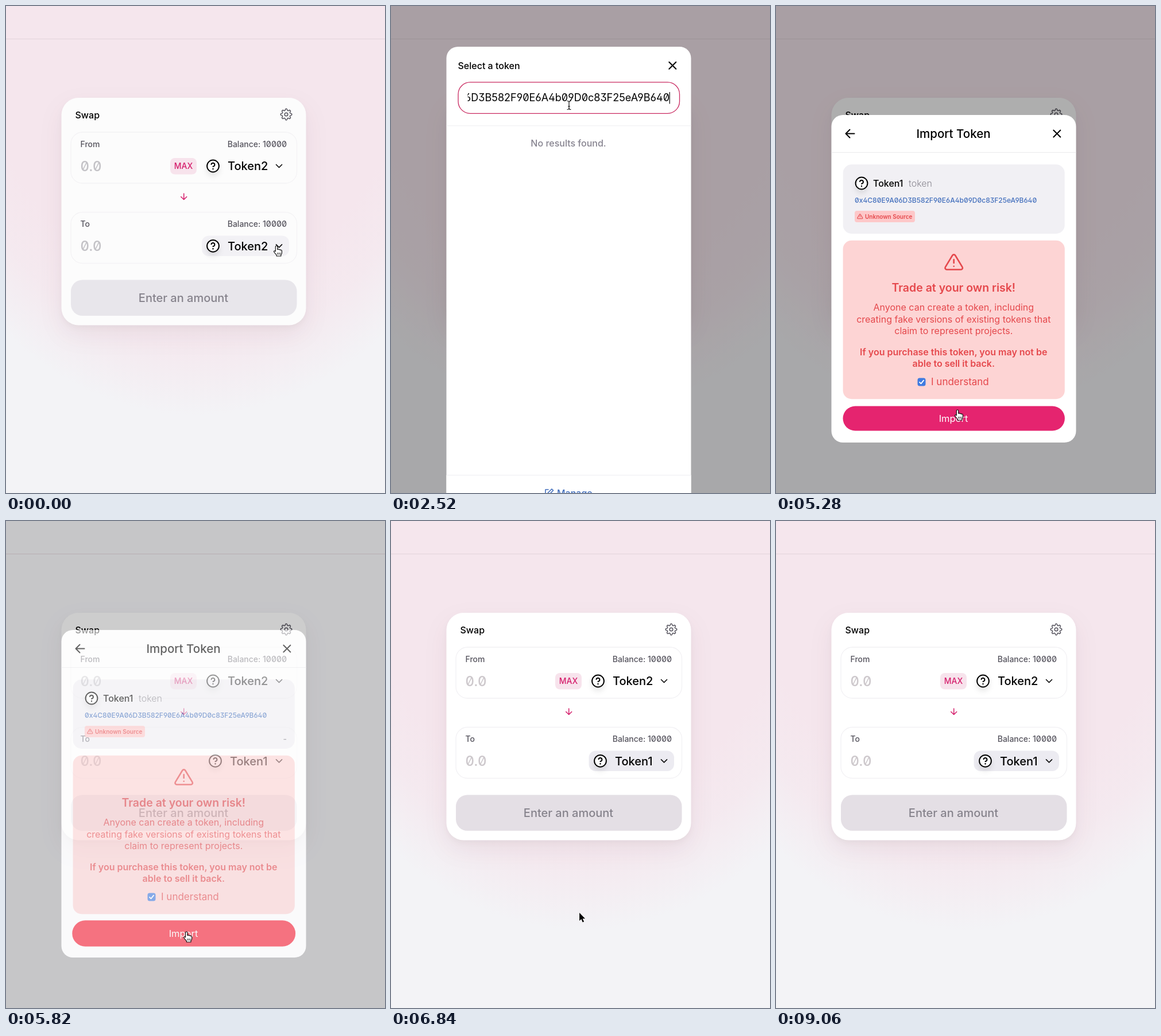
These frames come from a looping animation (660 by 849 pixels, 9.36 s). An HTML page:

```html
<!DOCTYPE html>
<html lang="en">
<head>
<meta charset="utf-8">
<title>Token swap</title>
<style>
  html, body { margin: 0; width: 100%; height: 100%; overflow: hidden; background: #f3f3f6; }
  svg { display: block; width: 660px; height: 849px; }
  text { font-family: Inter, "Liberation Sans", sans-serif; font-feature-settings: "zero", "ss01"; font-optical-sizing: none; white-space: pre; }
  .line { fill: none; stroke-linecap: round; stroke-linejoin: round; }
  .card { fill: #fcfcfc; filter: drop-shadow(0 4px 5px rgba(60,20,40,.04)) drop-shadow(0 16px 20px rgba(60,20,40,.06)); }
  .panel { fill: none; stroke: #f4f3f5; stroke-width: 1.3; }
  .zero { fill: #c3c2c6; }
  .action { fill: #e8e6eb; }
  .pill { fill: #f2f1f5; }
  .done .card { fill: #fff; }
  .done .panel { stroke: #f2f1f4; }
  .done .zero { fill: #cdc8cc; }
  .done .action { fill: #e4dfe5; }
  .done .pill { fill: #ecebf1; }
  .shade { filter: drop-shadow(0 6px 5px rgba(0,0,0,.09)); }
</style>
</head>
<body>
<svg id="stage" viewBox="0 0 660 849"></svg>
<script>
const LOOP = 9360, STEP = 60;
const ADDRESS = '0x4C80E9A06D3B582F90E6A4b09D0c83F25eA9B640';
const PINK = '#e5246f', RED = '#e5484c', BLUE = '#4470bd', GREY = '#56545e';

const text = (x, y, size, weight, fill, str, anchor = 'start', extra = '') =>
  `<text x="${x}" y="${y}" font-size="${size}" font-weight="${weight}" fill="${fill}" text-anchor="${anchor}" ${extra}>${str}</text>`;
const box = (x, y, w, h, r, extra) =>
  `<rect x="${x}" y="${y}" width="${w}" height="${h}" rx="${r}" ${extra}/>`;
const line = (d, color, width, extra = '') =>
  `<path class="line" d="${d}" stroke="${color}" stroke-width="${width}" ${extra}/>`;
const group = (id, body, extra = '') => `<g id="${id}" ${extra}>${body}</g>`;

const help = (x, y) => `<g transform="translate(${x} ${y})">
  <circle class="shade" r="11.5" fill="#fff"/>
  <circle r="10.4" fill="none" stroke="#000" stroke-width="2"/>
  ${line('M-3-3a3 3 0 0 1 5.9 1c0 2-2.9 3-2.9 3', '#000', 2)}<circle cy="5" r="1.2"/></g>`;
const close = (x, y) => line(`M${x - 6} ${y - 6}l12 12m0-12l-12 12`, '#000', 2);
const chevron = y => line(`M470.5 ${y - 2.5}l5 5 5-5`, '#111', 1.7);
const warn = (x, y, s, w) => `<g transform="translate(${x} ${y}) scale(${s})">
  ${line('M-1.7-8.1L-10.2 6a2 2 0 0 0 1.7 3H8.5a2 2 0 0 0 1.7-3L1.7-8.1a2 2 0 0 0-3.4 0zM0-3v4M0 5v.01', RED, w)}</g>`;

function gear(x, y) {
  let d = '';
  for (let i = 0; i <= 96; i++) {
    const a = i / 96 * 2 * Math.PI;
    const r = 8.4 + 1.35 * Math.tanh(2 * Math.cos(8 * a));
    d += `${i ? 'L' : 'M'}${(x + r * Math.sin(a)).toFixed(2)} ${(y - r * Math.cos(a)).toFixed(2)}`;
  }
  return line(d + 'z', GREY, 1.5) + `<circle cx="${x}" cy="${y}" r="2.8" fill="none" stroke="${GREY}" stroke-width="1.5"/>`;
}

const backdrop = `
  <defs>
    <radialGradient id="glow" gradientUnits="userSpaceOnUse" cx="0" cy="0" r="1" gradientTransform="translate(330 0) scale(660 849)">
      <stop offset=".58" stop-color="#f5e6ed"/>
      <stop offset=".7" stop-color="#f5e6ed" stop-opacity=".75"/>
      <stop offset=".84" stop-color="#f5e6ed" stop-opacity="0"/>
    </radialGradient>
    <clipPath id="field"><rect x="133.5" y="140" width="353" height="40"/></clipPath>
  </defs>
  <rect width="660" height="849" fill="#f3f3f6"/>
  ${box(0, 0, 660, 849, 0, 'id="pink" fill="url(#glow)"')}
  <rect y="57" width="660" height="1" fill="#e2d4db"/>`;

const token = (id, name, y, x) => group(id, help(x, y) + text(x + 25.5, y + 7.3, 20, 500, '#000', name));

const swap = group('swap', `
  ${box(96.5, 160, 426, 396.5, 30, 'class="card"')}
  ${text(120.5, 196, 16, 500, '#000', 'Swap')}
  ${gear(488, 189)}
  ${[220, 359.5].map(y => box(113, y, 393.5, 89, 20, 'class="panel"')).join('')}
  ${text(129.5, 245.6, 14, 500, GREY, 'From')}
  ${text(489, 245.6, 14, 500, GREY, 'Balance: 10000', 'end')}
  ${text(129.5, 287.7, 24, 500, '', '0.0', 'start', 'class="zero"')}
  ${box(286, 265, 46, 28.5, 8, 'fill="#f7e3ec"')}
  ${text(309, 284.3, 14, 500, '#d51f6c', 'MAX', 'middle')}
  ${token('from', 'Token2', 279, 360.5)}${chevron(279)}
  ${line('M309.7 327v10.5m-5-5l5 5 5-5', '#d51f6c', 1.5)}
  ${text(129.5, 385, 14, 500, GREY, 'To')}
  ${text(489, 385, 14, 500, GREY, 'Balance: 10000', 'end', 'id="balance"')}
  ${text(129.5, 426.9, 24, 500, '', '0.0', 'start', 'class="zero"')}
  ${box(341, 400.5, 152, 35.5, 12, 'id="pill" class="pill"')}
  ${token('old', 'Token2', 418.3, 360.5)}${token('new', 'Token1', 418.3, 364.5)}${chevron(418.3)}
  ${box(113, 477.5, 393.5, 62.5, 20, 'class="action"')}
  ${text(309, 516.2, 20, 500, '#86838c', 'Enter an amount', 'middle')}`);

const rows = [['Coin', 'Coin', '0'], ['Token2', 'token', '10000'], ['Token3', 'token', '0'], ['Token4', 'token', '0'], ['Test', 'token', '1000']];
const rowY = i => 241 + 56 * i;
const tokenRow = ([name, sub, sum], i) => {
  const y = rowY(i);
  return box(97, y - 28, 425, 56, 0, `class="row" fill="#f5f4f7"`) +
    `<g opacity="${i === 1 ? .5 : 1}">${help(129, y + 1)}
    ${text(157, y - 4, 16, 500, '#000', name)}
    ${text(157, y + 12, 12, 300, '#6e6b76', i ? sub + ' • Added by user' : sub)}
    ${text(503, y + 5, 16, 400, '#000', sum, 'end')}</g>`;
};

const select = group('select', `
  ${box(96.5, 71, 426, 809, 20, 'fill="#fff"')}
  ${text(116.5, 109.6, 16, 500, '#000', 'Select a token')}${close(490.3, 103.7)}
  ${group('list', rows.map(tokenRow).join(''))}
  ${box(117, 132.8, 385.5, 54.5, 21, 'id="search" fill="#fff" stroke-width="1.3"')}
  <g clip-path="url(#field)">
    ${text(133.5, 166.3, 18, 400, '#c3c1c9', 'Search name or paste address', 'start', 'id="hint"')}
    ${text(133.5, 166.3, 18, 400, '#000', ADDRESS, 'start', 'id="query"')}
  </g>
  ${box(484.6, 150, 1.2, 20.5, 0, 'id="caret" fill="#000"')}
  <rect x="96.5" y="208.3" width="426" height="1" fill="#eeeef1"/>
  ${text(309, 244.8, 16, 500, '#86838f', 'No results found.', 'middle', 'id="none"')}
  ${group('found', help(129, 257) + text(157, 263, 16, 500, '#000', 'Token1') +
    text(219, 262, 12.5, 300, '#8a8791', 'token') +
    box(427, 240.5, 77, 34, 17, 'id="add"') + text(465.2, 263, 14.7, 400, '#fff', 'Import', 'middle'))}
  <path d="M96.5 818H522.5V849H96.5z" fill="#fff"/>
  <rect x="96.5" y="817.5" width="426" height="1" fill="#eeeef1"/>
  ${line('M274 843h-5v13h13v-5M280 842l2.5 2.5-7 7-3.5 1 1-3.5z', BLUE, 1.6)}
  ${text(289, 854.5, 16, 500, BLUE, 'Manage')}`);

const body = (y, weight, str) => text(309.3, y, 16, weight, RED, str, 'middle');
const confirm = group('confirm', `
  ${box(96.5, 190, 426, 571, 20, 'fill="#fff"')}
  ${line('M136.5 222.5h-15m7-7l-7 7 7 7', '#000', 2)}
  ${text(309, 229.7, 20.5, 500, '#000', 'Import Token', 'middle')}${close(489.3, 222.5)}
  <rect x="96.5" y="254.8" width="426" height="1" fill="#e9e8ec"/>
  ${box(116.7, 276.3, 386, 120.7, 15, 'fill="#f1f0f4"')}
  ${help(149, 309)}
  ${text(169, 314.8, 16, 500, '#000', 'Token1')}
  ${text(231, 314.8, 16, 300, '#8a8791', 'token')}
  ${text(137, 343.3, 12, 500, BLUE, ADDRESS)}
  ${box(137, 357, 105, 20, 4, 'fill="#fdc8c9"')}
  ${warn(146.3, 366.8, .43, 2.5)}
  ${text(155, 370.6, 10, 600, RED, 'Unknown Source')}
  ${box(116.6, 408.8, 386.2, 276.4, 15, 'fill="#fdd4d4"')}
  ${warn(309.7, 446.5, 1.45, 1.8)}
  ${text(309.3, 497.6, 19.5, 600, RED, 'Trade at your own risk!', 'middle')}
  ${body(531.3, 400, 'Anyone can create a token, including')}
  ${body(551.6, 400, 'creating fake versions of existing tokens that')}
  ${body(572, 400, 'claim to represent projects.')}
  ${body(608.5, 600, 'If you purchase this token, you may not be')}
  ${body(628.8, 600, 'able to sell it back.')}
  ${box(247, 649, 13, 13, 2.5, 'id="check" stroke-width="1"')}
  ${line('M250 655.8l2.5 2.6 4.6-5.8', '#fff', 1.8, 'id="tick"')}
  ${text(270, 661.3, 17, 400, RED, 'I understand')}
  ${box(116.5, 697.5, 386.4, 43, 21.5, 'id="go"')}
  ${text(309, 725.4, 16.5, 400, '#fff', 'Import', 'middle', 'id="goText"')}`);

const pointers = `
  ${group('hand', `<path d="M-1.7 1.7a1.7 1.7 0 0 1 3.4 0V6.6c.4-1 2.6-.9 2.8.4.5-.8 2.4-.6 2.6.7.7-.6 2.3-.3 2.3 1.1V12c0 2-1.3 2.7-1.6 4.2V18H.2V16.6C-.8 14.5-3.5 12.3-4.5 10.3c-.4-1.3 1.3-2 2.3-1l.5.6z"
    fill="#fff" stroke="#111" stroke-width="1.2" stroke-linejoin="round"/>${line('M1.7 12.3v2.9m2.3-2.9v2.9m2.3-2.9v2.9', '#111', .9)}`)}
  ${group('arrow', '<path d="M0 0V14l3.2-3 2.4 5.6 2.4-1L5.6 10.2H10z" stroke="#fff" stroke-width="1" paint-order="stroke"/>')}
  ${group('beam', line('M-3-7.5q3 0 3 2.5 0-2.5 3-2.5M0-5V5M-3 7.5q3 0 3-2.5 0 2.5 3 2.5M-1.5 2h3', '#111', 1.2))}`;

const stage = document.getElementById('stage');
stage.innerHTML = backdrop + swap +
  group('modal', '<rect width="660" height="849" fill="#000" fill-opacity=".31"/>' + select + confirm) + pointers;
const el = {};
stage.querySelectorAll('[id]').forEach(n => el[n.id] = n);
const rowBands = [...stage.querySelectorAll('.row')];

// time, x, y, pointer used from then on
const path = [
  [0, 471, 418, 'hand'], [300, 469, 417, 'hand'], [960, 469, 417, 'hand'],
  [1440, 400, 300, 'arrow'], [1740, 318, 180, 'beam'], [1920, 310, 173, 'beam'], [3060, 310, 173, 'beam'],
  [3300, 350, 192, 'arrow'], [3780, 478, 257, 'arrow'], [4320, 478, 257, 'arrow'],
  [4740, 252, 648, 'hand'], [4980, 252, 648, 'hand'], [5280, 316, 704, 'hand'], [5460, 315, 716, 'hand'],
  [5940, 314, 716, 'arrow'], [6780, 314, 716, 'arrow'], [7020, 404, 505, 'arrow'], [7200, 610, 420, 'arrow'],
  [7440, 470, 282, 'arrow'], [7740, 166, 500, 'arrow'], [8040, 198, 262, 'arrow'], [8220, 285, 330, 'arrow'],
  [8460, 68, 560, 'arrow'], [8700, 78, 752, 'arrow'], [9060, 95, 860, 'arrow'], [LOOP, 95, 860, 'arrow']
];

const clamp = v => Math.min(1, Math.max(0, v));
const ramp = (t, a, b) => clamp((t - a) / (b - a));
const show = (node, on) => node.setAttribute('visibility', on ? 'inherit' : 'hidden');
const set = (node, attrs) => { for (const k in attrs) node.setAttribute(k, attrs[k]); };

function pointerAt(t) {
  const i = path.findIndex((p, n) => n + 1 === path.length - 1 || t < path[n + 1][0]);
  const [t0, x0, y0, kind] = path[i], [t1, x1, y1] = path[i + 1];
  const u = ramp(t, t0, t1), e = u * u * (3 - 2 * u);
  return { x: x0 + (x1 - x0) * e, y: y0 + (y1 - y0) * e, kind };
}

function render(t) {
  const p = pointerAt(t);
  for (const kind of ['hand', 'arrow', 'beam']) {
    show(el[kind], kind === p.kind);
    set(el[kind], { transform: `translate(${p.x.toFixed(1)} ${p.y.toFixed(1)})` });
  }

  // swap card
  const picked = t >= 5700, loaded = t >= 6120;
  stage.classList.toggle('done', loaded);
  show(el.old, !picked);
  show(el.new, picked);
  show(el.pill, t < 840 || loaded);
  set(el.pill, picked ? { x: 344.5, width: 148.5 } : { x: 341, width: 152 });
  el.balance.textContent = picked && !loaded ? '-' : 'Balance: 10000';
  set(el.pink, { opacity: 1 - ramp(t, 5640, 5790) + ramp(t, 5940, 6240) });

  // dialogs
  set(el.modal, { opacity: ramp(t, 640, 840) - ramp(t, 5740, 5940) });
  const picking = t < 4020;
  show(el.select, picking);
  show(el.confirm, !picking);

  const pasted = t >= 2160, focused = t >= 1860 && t < 3840, result = t >= 2760;
  show(el.list, !pasted);
  rowBands.forEach((band, i) => band.style.opacity = t >= 840 && Math.abs(p.y - rowY(i)) < 28 ? 1 : 0);
  show(el.hint, !pasted);
  show(el.query, pasted);
  set(el.query, focused ? { x: 485, 'text-anchor': 'end' } : { x: 133.5, 'text-anchor': 'start' });
  show(el.caret, pasted && focused);
  set(el.search, { stroke: focused ? '#c92a61' : '#e9e8ec' });
  show(el.none, pasted && !result);
  show(el.found, result);
  set(el.add, { fill: t >= 3720 ? '#cf2068' : PINK });

  const checked = t >= 4860, ring = t >= 5640, closing = t >= 5760;
  const fill = closing ? '#f71d32' : checked ? PINK : '#e8e6eb';
  set(el.check, { fill: checked ? '#3f7be0' : '#fff', stroke: checked ? '#3f7be0' : '#77757c' });
  show(el.tick, checked);
  set(el.go, { fill, stroke: ring ? fill : 'none', 'stroke-width': 2.4 });
  set(el.goText, { fill: checked ? '#fff' : '#86838c' });
}

const start = performance.now();
function frame(now) {
  const t = Math.max(0, now - start) % LOOP;
  render(Math.floor(t / STEP) * STEP);
  requestAnimationFrame(frame);
}
render(0);
requestAnimationFrame(frame);
</script>
</body>
</html>
```
